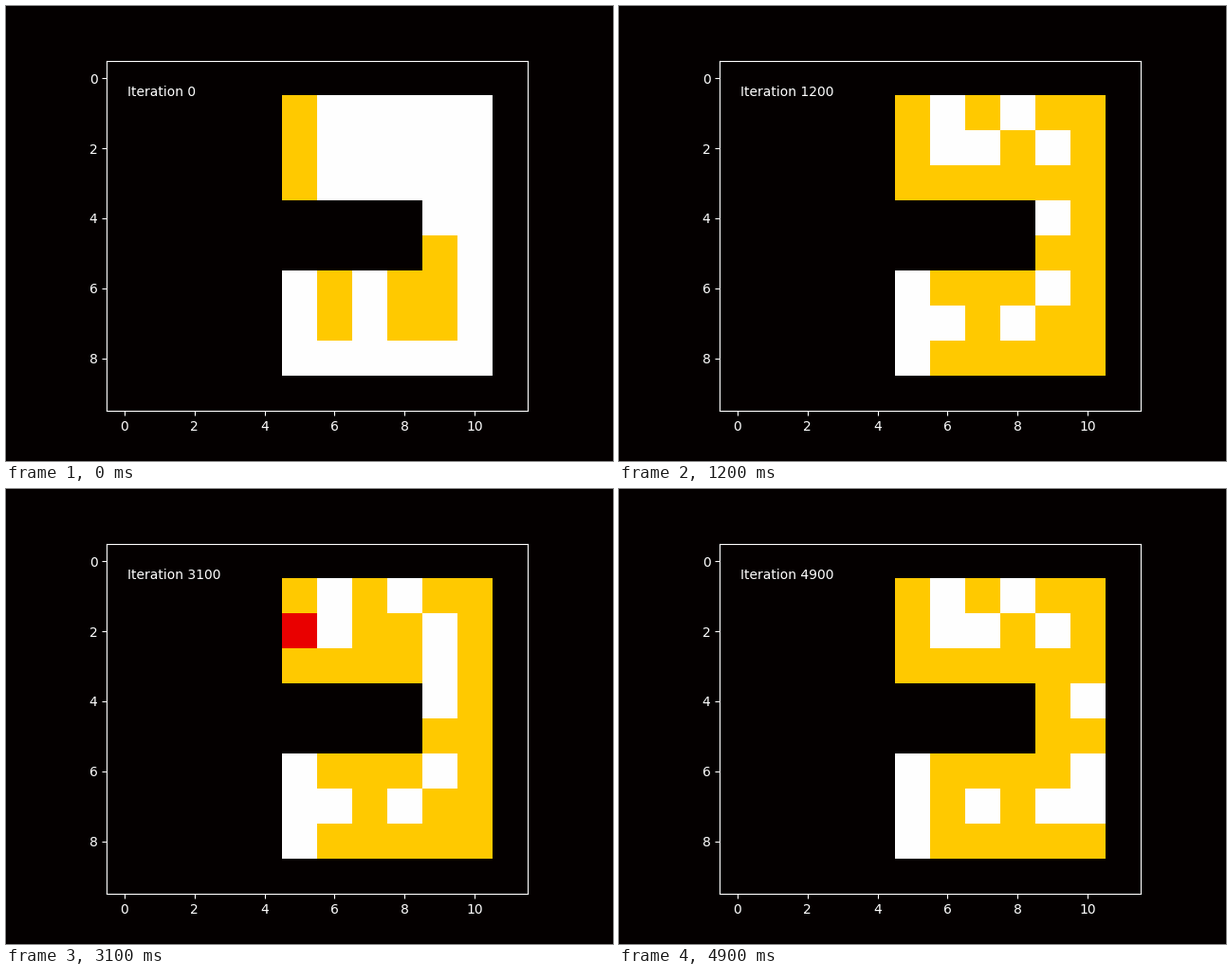
A matplotlib script for the animation above (5000 ms loop, 640 by 480 pixels).

```python
import numpy as np
import matplotlib.pyplot as plt
from matplotlib.animation import FuncAnimation
from matplotlib.colors import ListedColormap

FRAMES, INTERVAL = 50, 100
ROWS, COLS = 10, 12
WALL, RED, YELLOW, WHITE = range(4)
BLACK = "#040000"
PALETTE = ListedColormap([BLACK, "#e90000", "#ffc900", "#fefefe"])

at = np.s_
START_LINE = at[6:9, 5]
FINISH_LINE = at[1:4, 5]


def track(state):
    """A U-shaped track filled with one state."""
    grid = np.full((ROWS, COLS), WALL)
    grid[1:9, 5:11] = state
    grid[4:6, 5:9] = WALL
    return grid


def paint(grid, state, *areas):
    grid = grid.copy()
    for area in areas:
        grid[area] = state
    return grid


def shift_right(grid, *areas):
    grid = grid.copy()
    for area in areas:
        grid[area] = np.roll(grid[area], 1, axis=-1)
    return grid


def learning_stages():
    """Yield (step, grid) pairs as the policy is refined."""
    grid = paint(track(WHITE), YELLOW, FINISH_LINE,
                 at[6:8, 6], at[6:8, 8], at[5:8, 9])
    yield 0, grid

    learned = paint(track(YELLOW), WHITE, START_LINE)
    yield 7, paint(learned, WHITE, at[2:4, 6], at[3, 7:10:2])

    grid = paint(learned, WHITE, at[1:8:6, 6:9:2], at[2, 6:8], at[2:7:2, 9])
    yield 12, grid

    grid = paint(grid, YELLOW, at[1:4, 5:11])
    grid = paint(grid, WHITE, at[1, 6], at[2, 8], at[2:5, 9])
    grid = paint(grid, RED, at[2:4, 5])
    yield 24, grid

    grid = paint(grid, YELLOW, at[2, 8], at[3, 5])
    grid = paint(grid, WHITE, at[1:3, 6], at[1, 8])
    yield 31, grid

    grid = paint(grid, YELLOW, at[2, 5], at[3, 9])
    grid = paint(grid, WHITE, at[2, 7], at[7, 9])
    grid = paint(grid, RED, at[3, 5])
    yield 43, grid

    grid = paint(grid, YELLOW, FINISH_LINE)
    yield FRAMES - 1, shift_right(grid, at[4, 9:11], at[6:8, 6:11])


def build_history():
    rng = np.random.default_rng(4)
    history = np.zeros((FRAMES, ROWS, COLS), int)
    stages = list(learning_stages())
    for (start, before), (end, after) in zip(stages, stages[1:]):
        share = rng.random((ROWS, COLS))
        if start == 0:
            share **= 1.5  # learning is fastest at first
        else:
            share[4:] = (1 + share[4:]) / 2  # lower rows settle later
        flip = start + 1 + (share * (end - start)).astype(int)
        for step in range(start, end + 1):
            history[step] = np.where(step >= flip, after, before)
    # Now and then one cell is tried out for a single step.
    for step in range(15, FRAMES, 6):
        row, col = rng.choice(np.argwhere(history[step] == YELLOW))
        history[step, row, col] = WHITE
    return history


history = build_history()

plt.style.use("dark_background")
fig, ax = plt.subplots(figsize=(6.4, 4.8), dpi=100, facecolor=BLACK)
image = ax.imshow(history[0], cmap=PALETTE, vmin=WALL, vmax=WHITE,
                  interpolation="nearest")
label = ax.text(0.05, 0.9, "", transform=ax.transAxes)


def update(step):
    image.set_data(history[step])
    label.set_text(f"Iteration {step * 100}")
    return image, label


animation = FuncAnimation(fig, update, frames=FRAMES, interval=INTERVAL,
                          repeat=True, repeat_delay=0)
plt.show()
```
